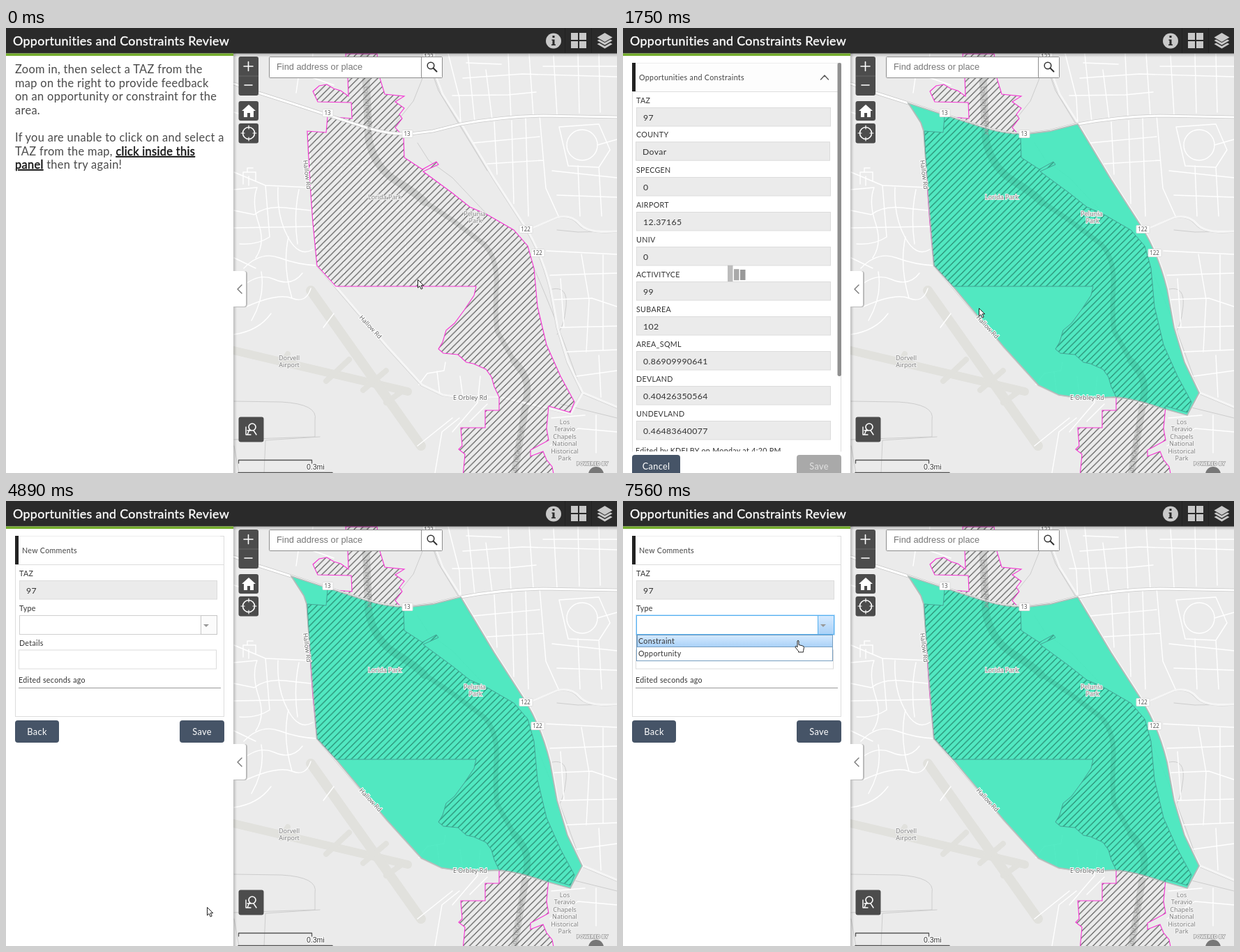
An HTML page for the animation above (7990 ms loop, 876x639 px).

```html
<!DOCTYPE html>
<html lang="en">
<head>
<meta charset="utf-8">
<title>Opportunities and Constraints Review</title>
<style>
html, body { margin: 0; width: 100%; height: 100%; overflow: hidden; background: #fff }
svg { display: block; font: 10.7px Lato, sans-serif; letter-spacing: .03em; fill: #333 }
.line { fill: none; stroke-linejoin: round; stroke-linecap: round }
.road { stroke: #fff; stroke-width: 1.4 }
.label { font: 9px "Noto Sans", sans-serif; letter-spacing: 0; fill: #858585; stroke: #f3f3f3; stroke-width: 2px; paint-order: stroke; text-anchor: middle }
.street { fill: #666; stroke: #fff; text-anchor: start }
.water { fill: #999; stroke: none; text-anchor: start }
.badge { font: 8px "Noto Sans", sans-serif; letter-spacing: 0; fill: #555; text-anchor: middle }
.value { font-size: 12.3px }
.caption { font-size: 12.8px; text-anchor: middle }
.intro { font-size: 16.4px; fill: #4a4a4a }
.strong { fill: #111; stroke: #111; stroke-width: .4; text-decoration: underline }
</style>
</head>
<body>
<svg width="876" height="639" viewBox="0 0 876 639">
<defs>
  <pattern id="hatch" width="10" height="10" patternUnits="userSpaceOnUse" patternTransform="scale(.931)"><path d="M-2 2l4-4M0 10l10-10M8 12l4-4" stroke="#444" stroke-width="1.2"/></pattern>
  <pattern id="tealHatch" width="10" height="10" patternUnits="userSpaceOnUse" patternTransform="scale(.931)"><path d="M-2 2l4-4M0 10l10-10M8 12l4-4" stroke="#258069" stroke-width="1.2"/></pattern>
  <path id="region" d="M487 37L490 72 491 98 480 90 470 87 460 81 449 83 440 91 447 106 495 107 496 130 461 127 459 150 432 148 436 225 440 280 446 341 473 371H674L671 384 657 405 643 424 631 434 626 451 620 461 627 467 648 469 660 480 670 482 688 490 696 501 700 515 707 530V549H687V574H652L654 600 649 605 658 612 655 645H786L783 630 775 620 770 608 752 615 752 606 778 592 775 575 778 543 809 552 815 537 795 500 775 455 762 400 757 345 748 313 728 290 690 268 665 257 640 237 598 206 620 196 617 192 597 203 571 186 570 156 558 143 568 130 564 124 571 115 558 106 571 98 543 95 536 72 532 37Z"/>
  <path id="zone" d="M409 108L461 125 520 144Q550 153 580 152L612 148 652 138 700 218 745 288Q768 326 780 375L790 430 805 480 826 524 809 556 770 545Q735 533 706 530L660 532 625 527 596 513 546 458 473 371 446 341 440 270 431 148 427 136Z"/>
  <clipPath id="inZone"><use href="#zone"/></clipPath>
  <clipPath id="formView"><rect x="13" y="50" width="300" height="558"/></clipPath>
  <linearGradient id="shade" x2="0" y2="1"><stop stop-opacity=".25"/><stop offset="1" stop-opacity="0"/></linearGradient>
  <linearGradient id="edge"><stop stop-opacity=".2"/><stop offset="1" stop-opacity="0"/></linearGradient>
  <linearGradient id="blue" x2="0" y2="1"><stop stop-color="#d6eaff"/><stop offset="1" stop-color="#a9d1f7"/></linearGradient>
</defs>

<rect x="326" width="550" height="639" fill="#ebebeb"/>
<g class="line">
  <g stroke="#e1e1dd">
    <path d="M322 462L576 522" stroke-width="12"/><path d="M437 377L595 600" stroke-width="14"/>
    <path d="M459 507L492 476M395 484L404 468M512 520L545 492M545 538L566 523" stroke-width="8"/>
  </g>
  <path stroke="#cdcdcd" d="M327 536L395 537Q448 540 443 563V587L327 591M605 37L596 75 584 105 560 135M590 165L606 190 640 215 690 268M690 205L620 90 603 42M790 290L820 293 876 292M783 375Q806 370 803 400T790 440M757 345Q790 420 826 524M450 587L372 592 370 639M795 540L876 560M327 600L334 639"/>
  <g class="road">
    <path d="M327 207L372 226 436 229M327 232L360 229Q352 250 362 280T358 330M372 226L378 300Q360 312 335 310M390 229Q388 270 404 300T440 318M327 262L356 268Q372 255 400 258T437 262M327 287L440 285M341 345Q365 320 392 330T446 341M335 375Q360 350 385 361T425 352M345 400Q390 380 410 388T437 374M352 420Q372 385 366 350M405 300Q396 340 410 388M420 232Q412 270 418 310M327 440Q362 435 380 410M327 330L358 345"/>
    <path d="M340 224V207H358V220M346 207V201H354M348 226V213M390 60Q410 55 420 65L416 93M327 121L350 128M440 37L436 70 470 82"/>
    <path d="M634 37L650 100 652 138M662 37L672 134M688 60L697 131M655 72L740 66 876 70M640 97L720 96 760 92M720 37L724 128M750 37L756 125M785 40L790 124M820 37L822 122M850 37L852 121M770 55H876M660 50L710 52"/>
    <path d="M765 125L774 230 792 270M793 142L850 138 866 175 850 200 806 198ZM804 168A22 22 0 1 0 848 168 22 22 0 1 0 804 168M848 168L876 160M783 205L876 215M790 240L876 243M820 198L823 270M850 200L854 270M700 135L704 210M725 133L728 252M745 128L749 270M670 165L765 156M690 195L770 190"/>
    <path d="M775 320L876 325M780 355L876 352M786 390L840 388 876 400M795 430L876 428M804 465L876 462M825 325L836 390 832 465M856 326V462M850 470L853 530M795 360L800 430M818 500L876 492"/>
    <path d="M592 512L604 496 628 492 630 480M618 493L622 526M651 500L655 530M680 500L676 538 640 580M590 600L640 560M615 639L625 580 650 560M690 540L665 565M780 600L820 575 876 580M782 560L830 556M846 556V610M470 410L455 430"/>
    <path d="M455 160V330M480 160L485 365M510 165L515 365M540 225V368M570 245L575 368M605 265V368M640 290V368M440 195L525 200M440 260L590 262M445 315L690 320" stroke-dasharray="3 4" opacity=".75" stroke-width="1"/>
  </g>
  <g id="river" stroke="#cfd0cf">
    <path d="M514 37L517 90 520 160Q528 200 560 220T600 250" stroke-width="11"/>
    <path d="M595 246L640 276 685 310Q705 330 703 370T704 435L735 490" stroke-width="7"/>
    <path d="M728 478Q750 500 747 525T737 590L728 645" stroke-width="10"/>
  </g>
  <path id="streets" stroke="#d0d0d0" stroke-width="3" d="M432 148L440 270 446 341 546 458 596 513 625 527 660 532 706 530 770 545 809 554L826 524M603 37L625 95 652 138 700 218 745 288Q768 326 780 375L790 430 805 480 826 524 876 545M748 290L790 272Q810 268 822 282T876 292"/>
  <use href="#streets" style="filter:brightness(1.3)" transform="translate(.7 -.3)" opacity=".8"/>
</g>

<use href="#region" fill="url(#hatch)" stroke="#f534d4" stroke-width="1.1"/>
<g class="line">
  <path id="highway" d="M327 80L362 93 409 108 461 125 520 144Q550 153 580 152L612 148 652 138Q710 127 770 126L876 128" stroke="#c9c9c9" stroke-width="4.600"/>
  <path d="M327 80L362 93 409 108 461 125 520 144Q550 153 580 152L612 148 652 138Q710 127 770 126L876 128" stroke="#fff" stroke-width="3"/>
</g>

<g id="selection">
  <use href="#zone" fill="#43e8be" fill-opacity=".91" stroke="#b4bbb9" stroke-width="1.800"/>
  <g clip-path="url(#inZone)">
    <use href="#river" class="line" opacity=".09" style="filter:brightness(.2)"/>
    <use href="#region" fill="url(#tealHatch)" stroke="#43a894"/>
  </g>
</g>

<g id="mapLabels">
  <g class="label">
    <text x="543" y="246">Lorida Park</text>
    <text x="672" y="270">Pelunia</text><text x="673" y="280">Park</text>
    <text x="406" y="477">Dorvell</text><text x="406" y="487">Airport</text>
  </g>
  <text class="label street" transform="translate(426 190)rotate(83)">Hallow Rd</text>
  <text class="label street" transform="translate(506 416)rotate(47)">Hallow Rd</text>
  <text class="label street" x="641" y="534">E Orbley Rd</text>
  <text class="label water" transform="translate(513 84)rotate(85)">Los Teravio River</text>
  <text class="label water" transform="translate(731 642)rotate(-81)">Los Teravio River</text>
</g>

<rect x="326" y="36" width="550" height="6" fill="url(#shade)"/>
<rect x="326" y="36" width="5" height="603" fill="url(#edge)"/>
<g id="controls">
  <path d="M327 349h15q4 0 4 4v43q0 5-4 5h-15z" fill="#bbb"/><path d="M326 349h15q3 0 3 3v45q0 3-3 3h-15z" fill="#fff"/>
  <path class="line" d="M338 369l-6 6 6 6" stroke="#777" stroke-width="1.4"/>
  <g fill="#4c4c4c"><rect x="333.500" y="41" width="28.500" height="56" rx="3"/><rect x="333.500" y="105" width="28.500" height="28" rx="3"/><rect x="333.500" y="137" width="28.500" height="28.500" rx="3"/><rect x="333.500" y="558.500" width="36" height="36" rx="3"/></g>
  <path d="M334 69H362" stroke="#666"/>
  <g class="line" stroke="#fff" stroke-width="1.6">
    <path d="M341 55h13M347.500 48.500v13M342 82h11"/>
    <circle cx="348" cy="151" r="8.500"/><path d="M348 140v5M348 157v5M337 151h5M354 151h5" stroke-width="1.2"/>
    <circle cx="353" cy="573" r="5"/><path d="M355 578l4 6M349 577l-3 7M344 573v11h7M346 578h5" stroke-width="1.4"/>
  </g>
  <path d="M348 110l10 9h-3v9h-5v-6h-4v6h-5v-9h-3z" fill="#fff"/>
  <rect x="377.500" y="41.500" width="248" height="30" rx="1" fill="#fff" stroke="#8d8d8d"/><path d="M595.500 41v30" stroke="#8d8d8d"/>
  <text x="388" y="60" style="font:12.8px 'Liberation Sans',Arial,sans-serif;letter-spacing:0" fill="#777">Find address or place</text>
  <g class="line" stroke="#333" stroke-width="1.5"><circle cx="609" cy="54" r="4.800"/><path d="M612.500 57.500l5 5" stroke-width="2"/></g>
  <path class="line" d="M333.500 625v-4.500H438.500v4.500M333 638.500H468" stroke="#555" stroke-width="1.3"/>
  <text x="431" y="634" style="font:10.500px 'Liberation Sans',Arial,sans-serif;letter-spacing:0" stroke="#fff" stroke-width="2" paint-order="stroke">0.3mi</text>
  <text x="818" y="628" style="font:700 7px 'Noto Sans',sans-serif;letter-spacing:0" fill="#fff" stroke="#999" stroke-width="1.5" paint-order="stroke">POWERED BY</text>
  <circle cx="846" cy="641" r="11" fill="#777"/>
</g>

<rect y="36" width="326" height="603" fill="#fff"/>
<g id="intro" class="intro">
  <text x="13" y="65">Zoom in, then select a TAZ from the</text>
  <text x="13" y="85">map on the right to provide feedback</text>
  <text x="13" y="104">on an opportunity or constraint for the</text>
  <text x="13" y="124">area.</text>
  <text x="13" y="163">If you are unable to click on and select a</text>
  <text x="13" y="183">TAZ from the map, <tspan class="strong">click inside this</tspan></text>
  <text x="13" y="202"><tspan class="strong">panel</tspan> then try again!</text>
</g>
<g id="form">
  <path class="line" d="M13.500 608V50.500H312.500V608" stroke="#ddd"/>
  <g clip-path="url(#formView)"><g id="scroller"></g></g>
  <rect id="thumb" x="307.500" y="50" width="5.500" height="450" rx="2.700" fill="#8f8f8f"/>
  <g id="loader"></g>
</g>
<g id="comment"></g>

<rect width="876" height="36.500" fill="#2a2a2a"/><rect y="36.500" width="326" height="3.500" fill="#74ac2c"/>
<text x="10" y="25" font-size="17.900" fill="#fff" stroke="#fff" stroke-width=".35">Opportunities and Constraints Review</text>
<path d="M801.500 0v36M839.500 0v36" stroke="#222"/>
<g fill="#c9c9c9">
  <circle cx="785" cy="18.500" r="11"/><path d="M783.500 11h3v3h-3zM782.500 16.500h4v7h1.500v1.500h-6v-1.500h1.500v-5.500h-1z" fill="#2a2a2a"/>
  <path d="M810 7h10v10h-10zM822 7h10v10h-10zM810 19h10v10h-10zM822 19h10v10h-10z"/>
  <path d="M858.500 7l11 6.500-11 6.500-11-6.500zM847.500 18l3-1.500 8 4.500 8-4.500 3 1.500-11 6.500zM847.500 23l3-1.500 8 4.500 8-4.500 3 1.500-11 6.500z"/>
</g>
<g id="cursor">
  <path id="arrow" d="M.5.5v11.500l2.700-2.500 2 4.500 2-1-2-4.300h3.600z" fill="#fff" stroke="#222"/>
  <path id="beam" class="line" d="M-2.500-5.500h2l.5.500.5-.5h2M0-5v11M-2.500 6.500h2l.5-.5.5.5h2" stroke="#333"/>
  <path id="hand" d="M-1 1q1-1.500 2 0v5.500l5.500 1.500q2 .5 2 2.500l-1 5v1.500h-7v-1.500l-4.500-5.500q0-2 1.500-1.500l1.500 1.500z" fill="#fff" stroke="#222" stroke-linejoin="round"/>
</g>
</svg>
<script>
const $ = id => document.getElementById(id);
const show = (id, on) => $(id).style.display = on ? '' : 'none';
const text = (x, y, s, attrs = '') => `<text x="${x}" y="${y}" ${attrs}>${s}</text>`;
const box = (x, y, w, h, fill, stroke = 'none', attrs = '') =>
  `<rect x="${x + .5}" y="${y + .5}" width="${w}" height="${h}" fill="${fill}" stroke="${stroke}" ${attrs}/>`;
const rule = (x, y, w, color) => `<path d="M${x} ${y + .5}h${w}" stroke="${color}"/>`;
const chevron = (y, id) => `<path id="${id}" class="line" d="M283.500 ${y + 3}l5.500-6 5.500 6" stroke="#555" stroke-width="1.3"/>`;
const button = (x, y, w, s, fill = '#465467', ink = '#fff') =>
  `<rect x="${x}" y="${y}" width="${w}" height="32" rx="4" fill="${fill}"/>` +
  text(x + w / 2, y + 20.5, s, `class="caption" fill="${ink}"`);
const field = (y, label, value, x = 19, w = 278) =>
  text(19, y - 6, label) + box(x, y, w, 26.5, '#ebebeb', '#dcdcdc') + text(x + 10, y + 18.8, value, 'class="value"');
const heading = (y, s, fill) =>
  box(13.5, y, 293, 41, fill) + `<rect x="13" y="${y}" width="5" height="41" fill="#222"/>` +
  text(23, y + 24.5, s, 'fill="#444"') + rule(14, y + 41, 299, '#ddd');
const tip = fill => `<path d="M283 177h8l-4 4z" fill="${fill}"/>`;

// County is a select box, set one pixel to the left of the inputs.
const fields = [['TAZ', '97'], ['COUNTY', 'Dovar'], ['SPECGEN', '0'], ['AIRPORT', '12.37165'], ['UNIV', '0'],
  ['ACTIVITYCE', '99'], ['SUBAREA', '102'], ['AREA_SQML', '0.86909990641'], ['DEVLAND', '0.40426350564'], ['UNDEVLAND', '0.46483640077']];
$('scroller').innerHTML = heading(50, 'Opportunities and Constraints', '#fdfdfd') + chevron(71, 'headChevron') +
  fields.map(([label, value], i) => field(114 + 50 * i - (i == 1 ? .8 : 0), label, value, i == 1 ? 18 : 19)).join('') +
  text(18, 611, 'Edited by KDELBY on Monday at 4:20 PM') + rule(18, 619, 285, '#999') +
  heading(661, 'Related Table/Layer', '#f3f3f3') + chevron(682, 'relatedChevron') +
  text(21, 724, 'New Comments') + text(260, 724, '(2)') + rule(20, 736, 287, '#ddd') +
  `<path class="line" d="M292 713h-10v17h14v-10M285 718h5M285 722h8M285 726h8M297 711v7M293.500 714.500h7" stroke="#555" stroke-width="1.2"/>`;
$('form').insertAdjacentHTML('beforeend', button(13, 613, 69, 'Cancel') + button(249, 613, 64, 'Save', '#a9a9a9', '#e2e2e2'));
$('loader').innerHTML = ['#bcbcbc', '#a9a9a9', '#999'].map((c, i) => `<rect x="${150 + 9 * i}" width="7.500" fill="${c}"/>`).join('');
$('comment').innerHTML = box(13, 50, 299, 259, '#fff', '#ddd') + heading(50, 'New Comments', '#fff') +
  field(114, 'TAZ', '97', 19, 283) + text(19, 158, 'Type') + box(19, 164, 283, 27, '#fff', '#d0d0d0', 'id="typeBox"') +
  box(279, 164, 23, 27, '#fbfbfb', '#c6c6c6', 'id="dropButton"') + tip('#999') +
  text(19, 208, 'Details') + box(18, 213.5, 283, 27, '#fff', '#dcdcdc') +
  text(18, 260.5, 'Edited seconds ago') + rule(18, 268, 290, '#999') +
  button(13, 315, 63, 'Back') + button(249, 315, 64, 'Save') +
  '<g id="menu">' + box(18, 163, 285, 29, 'none', '#bfe0fa') + box(19, 192, 281, 37, '#fff', '#759dc0') +
  box(20, 192, 280, 17, 'url(#blue)', '#759dc0', 'id="choice"') +
  text(22, 205, 'Constraint') + text(22, 223, 'Opportunity') + '</g>';

const badges = [[461, 122, 13], [575, 152, 13], [745, 289, 122], [762, 323, 122], [606, 41, 122]];
const parkName = ['Los', 'Teravio', 'Chapels', 'National', 'Historical', 'Park'];
$('mapLabels').innerHTML += badges.map(([x, y, n]) => {
  const w = n > 99 ? 19 : 15;
  return box(x - w / 2, y - 6, w, 11, '#fff', '#ddd', 'rx="1"') + text(x, y + 3, n, 'class="badge"');
}).join('') + parkName.map((s, i) => text(801, 569 + 10.4 * i, s, 'class="label"')).join('');

const LOOP = 7990;
const path = [[0, 590, 361, 'arrow'], [400, 593, 380, 'arrow'], [520, 598, 407, 'arrow'], [1600, 595, 408, 'arrow'],
  [1750, 510, 402, 'arrow'], [1870, 375, 391, 'arrow'], [2000, 280, 384, 'arrow'], [2140, 265, 384, 'arrow'], [2260, 261, 384, 'arrow'],
  [3630, 261, 475, 'arrow'], [3780, 265, 525, 'arrow'], [3900, 276, 562, 'arrow'], [4020, 284, 579, 'arrow'], [4140, 288, 583, 'arrow'],
  [4290, 288, 582, 'hand'], [4890, 288, 583, 'arrow'], [5040, 266, 548, 'arrow'], [5160, 219, 493, 'arrow'], [5280, 172, 435, 'arrow'],
  [5420, 148, 320, 'arrow'], [5540, 132, 209, 'beam'], [5690, 130, 187, 'beam'], [5810, 129, 184, 'beam'],
  [5960, 178, 181, 'beam'], [6090, 244, 178, 'beam'], [6220, 287, 173, 'arrow'], [6370, 287, 173, 'hand'],
  [7180, 284, 179, 'hand'], [7320, 275, 189, 'hand'], [7440, 262, 196, 'hand'], [7560, 251, 200, 'hand']];

function paint(id, fill, stroke) {
  $(id).setAttribute('fill', fill);
  $(id).setAttribute('stroke', stroke);
}

function draw() {
  const t = performance.now() % LOOP;
  show('intro', t < 800);
  show('selection', t >= 800);
  show('form', t >= 800 && t < 4890);
  show('comment', t >= 4890);

  show('headChevron', t >= 950);
  const scroll = t < 3200 ? 0 : t < 3350 ? 67 : 133;
  $('scroller').setAttribute('transform', `translate(0 ${-scroll})`);
  $('thumb').setAttribute('y', 50 + scroll * 107 / 133);

  show('loader', t < 2780);
  [...$('loader').children].forEach((bar, i) => {
    const grow = 9 * Math.max(0, Math.sin(2 * Math.PI * ((t - 800) / 800 - i * .17)));
    bar.setAttribute('y', 347 - grow * .75);
    bar.setAttribute('height', 15 + grow);
  });

  const open = t >= 6770, hover = t >= 5540;
  paint('typeBox', open || !hover ? '#fff' : t < 5690 ? '#f3f9ff' : '#e6f2fe', open ? '#55b0f0' : hover ? '#759dc0' : '#d0d0d0');
  paint('dropButton', t >= 6220 ? 'url(#blue)' : hover ? '#f3f3f3' : '#fbfbfb', open ? '#55b0f0' : hover ? '#759dc0' : '#c6c6c6');
  show('menu', open);
  show('choice', t >= 7320);

  const [, x, y, kind] = path.findLast(p => p[0] <= t);
  for (const id of ['arrow', 'beam', 'hand']) show(id, id == kind);
  $('cursor').setAttribute('transform', `translate(${x} ${y})`);
  requestAnimationFrame(draw);
}
draw();
</script>
</body>
</html>
```
